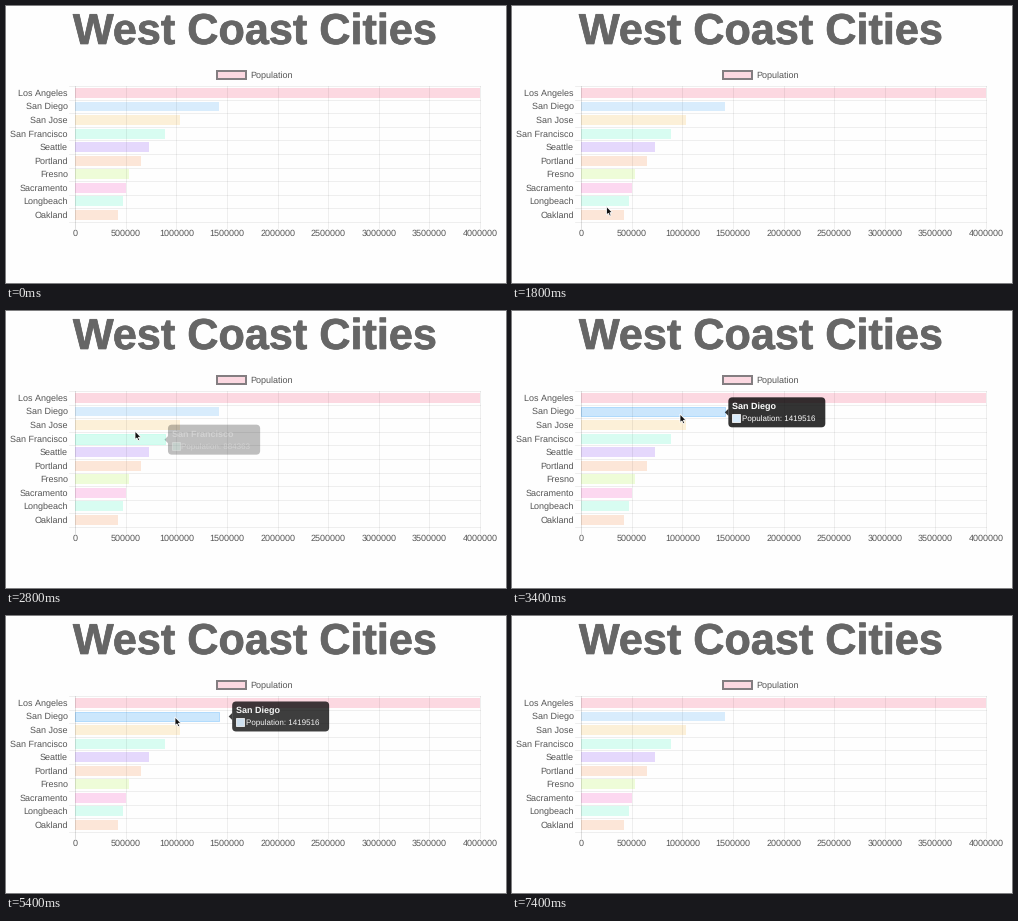
A matplotlib script for the animation above (10 s loop, 500x277 px).

```python
from colorsys import hsv_to_rgb

import matplotlib.pyplot as plt
import numpy as np
from matplotlib.animation import FuncAnimation
from matplotlib.patches import FancyBboxPatch, Polygon, Rectangle
from matplotlib.patheffects import withStroke

W, H, DPI = 500, 277, 100
STEP, FRAMES = 100, 100     # ms per frame, frames per loop
TICK, TWEEN = 10, 400       # ms per simulation step, ms per hover easing
PX = 72 / DPI

plt.rcParams["font.family"] = "Liberation Sans"
plt.rcParams["text.hinting"] = "none"
plt.rcParams["text.hinting_factor"] = 1

# name, population, hue in degrees
CITIES = [
    ("Los Angeles", 3999759, 345),
    ("San Diego", 1419516, 207),
    ("San Jose", 1035317, 40),
    ("San Francisco", 884363, 161),
    ("Seattle", 724745, 261),
    ("Portland", 647805, 24),
    ("Fresno", 527438, 83),
    ("Sacramento", 501901, 320),
    ("Longbeach", 469450, 161),
    ("Oakland", 425195, 24),
]
N = len(CITIES)

LEFT, RIGHT, TOP, PITCH = 69.2, 474.0, 80.2, 13.55
BOTTOM = TOP + N * PITCH
BAR_H = 9.8
TIP_H, CARET = 30, 3.5

# Pointer stops: arrival ms, rest ms, x, y
STOPS = [
    (600, 0, 40, 240), (1400, 0, 94, 203), (1800, 0, 94.5, 200.4),
    (2450, 0, 122, 129.5), (2800, 0, 129, 120), (3050, 0, 155, 104.5),
    (3400, 300, 168, 103), (4000, 900, 249, 88), (5400, 450, 169, 101),
    (6300, 550, 164, 111), (7400, 0, 235, 277),
]
SHOWN = STOPS[0][0], STOPS[-1][0]
KEYS = np.array([(t, x, y) for t0, rest, x, y in STOPS for t in (t0, t0 + rest)]).T


def tint(hue, glow=0.0):
    return hsv_to_rgb(hue / 360, 0.145 * (1 + glow), 0.99)


def x_of(value):
    return LEFT + (RIGHT - LEFT) * value / 4e6


def row_y(i):
    return TOP + (i + 0.5) * PITCH


def tip_width(i):
    return 63.5 + 4.78 * len(str(CITIES[i][1]))


def tip_x(i):
    """Right of the bar's end, or left of it where the stage runs out."""
    end, width = x_of(CITIES[i][1]), tip_width(i)
    return end + CARET if end + CARET + width < W else end - CARET - width


def pointer(t):
    return np.interp(t, KEYS[0], KEYS[1]), np.interp(t, KEYS[0], KEYS[2])


def hit(t):
    if SHOWN[0] <= t < SHOWN[1]:
        x, y = pointer(t)
        for i, (_, value, _) in enumerate(CITIES):
            if abs(y - row_y(i)) < BAR_H / 2 and LEFT < x < x_of(value):
                return i
    return None


def simulate():
    """Per frame: (last hovered row, [opacity, x, y, highlight per row])."""
    state = np.zeros(3 + N)
    state[1:3] = tip_x(N - 1), row_y(N - 1)
    start, goal, since = state.copy(), state.copy(), -TWEEN
    hovered, last, out = None, N - 1, []
    for t in range(0, FRAMES * STEP, TICK):
        p = min((t - since) / TWEEN, 1)
        state = goal + (start - goal) * (1 - p) ** 4
        now = hit(t)
        if now != hovered:
            hovered, since, start = now, t, state.copy()
            goal = np.zeros(3 + N)
            goal[1:3] = state[1:3]
            if now is not None:
                last = now
                goal[:3] = 1, tip_x(now), row_y(now) + 0.8
                goal[3 + now] = 1
        if t % STEP == 0:
            out.append((last, state.copy()))
    return out


STATES = simulate()

fig = plt.figure(figsize=(W / DPI, H / DPI), dpi=DPI, facecolor="#fefefe")
ax = fig.add_axes([0, 0, 1, 1])
ax.set_xlim(0, W)
ax.set_ylim(H, 0)
ax.axis("off")


def label(x, y, s, size=8.6, color="#555555", **kw):
    return ax.text(x, y, s, fontsize=size * PX, color=color, va="baseline", **kw)


label(248, 38, "West Coast Cities", 43.2, "#666666", ha="center", weight="bold",
      path_effects=[withStroke(linewidth=0.7 * PX, foreground="#666666")])

ax.add_patch(Rectangle((211.2, 65.2), 29, 8, fc=tint(345), ec="#837e81", lw=2 * PX))
label(244, 72, "Population")

bars = []
for i, (name, value, hue) in enumerate(CITIES):
    bar = Rectangle((LEFT, row_y(i) - BAR_H / 2), x_of(value) - LEFT, BAR_H, zorder=2)
    bars.append(ax.add_patch(bar))
    label(62, row_y(i) + 3, name, ha="right")

grid = dict(color="black", lw=0.7 * PX, zorder=3)
for i in range(N + 1):
    y = TOP + i * PITCH
    ax.plot([LEFT - 6, RIGHT], [y, y], alpha=0.09, **grid)
for v in range(0, 4000001, 500000):
    x = x_of(v)
    ax.plot([x, x], [TOP, BOTTOM + 6], alpha=0.09 if v else 0.18, **grid)
    label(x, 230.3, str(v), ha="center")

box = ax.add_patch(FancyBboxPatch((0, 0), 1, TIP_H, fc="black", lw=0, zorder=5,
                                  boxstyle="round,pad=0,rounding_size=4"))
caret = ax.add_patch(Polygon([(0, 0)] * 3, fc="black", lw=0, zorder=5))
swatch = ax.add_patch(Rectangle((0, 0), 8, 8, ec="white", lw=0.8 * PX, zorder=6))
head = label(0, 0, "", color="white", weight="bold", zorder=6)
body = label(0, 0, "", 8.3, color="white", zorder=6)
tooltip = [box, caret, swatch, head, body]

ARROW = np.array([(0, 0), (0, 8.6), (1.9, 6.9), (3.2, 9.8), (4.7, 9.1),
                  (3.4, 6.3), (6, 6.2)])
arrow = ax.add_patch(Polygon(ARROW, fc="#111111", ec="white", lw=0.8 * PX, zorder=8))


def draw_tooltip(row, opacity, x, y):
    visible = opacity > 0.03
    for part in tooltip:
        part.set_visible(visible)
        part.set_alpha(opacity * (0.8 if part in (box, caret) else 1))
    if not visible:
        return
    name, value, hue = CITIES[row]
    width, top = tip_width(row), y - TIP_H / 2
    box.set_bounds(x, top, width, TIP_H)
    flipped = tip_x(row) < x_of(value)
    edge, tip = (x + width, CARET) if flipped else (x, -CARET)
    caret.set_xy([(edge, y - CARET), (edge + tip, y), (edge, y + CARET)])
    swatch.set_xy((x + 4, top + 17))
    swatch.set_facecolor(tint(hue))
    head.set_position((x + 3.8, top + 12))
    head.set_text(name)
    body.set_position((x + 13.4, top + 24.2))
    body.set_text(f"Population: {value}")


def update(frame):
    t = frame * STEP
    row, state = STATES[frame]
    for bar, (_, _, hue), glow in zip(bars, CITIES, state[3:]):
        bar.set_facecolor(tint(hue, 0.35 * glow))
        bar.set_edgecolor(tint(hue, 1.1 * glow))
        bar.set_linewidth(PX if glow > 0.03 else 0)
    draw_tooltip(row, *state[:3])
    arrow.set_visible(SHOWN[0] <= t < SHOWN[1])
    arrow.set_xy(ARROW + pointer(t))
    return [*bars, *tooltip, arrow]


anim = FuncAnimation(fig, update, frames=FRAMES, interval=STEP,
                     init_func=lambda: update(0), repeat=True, repeat_delay=0)
plt.show()
```
